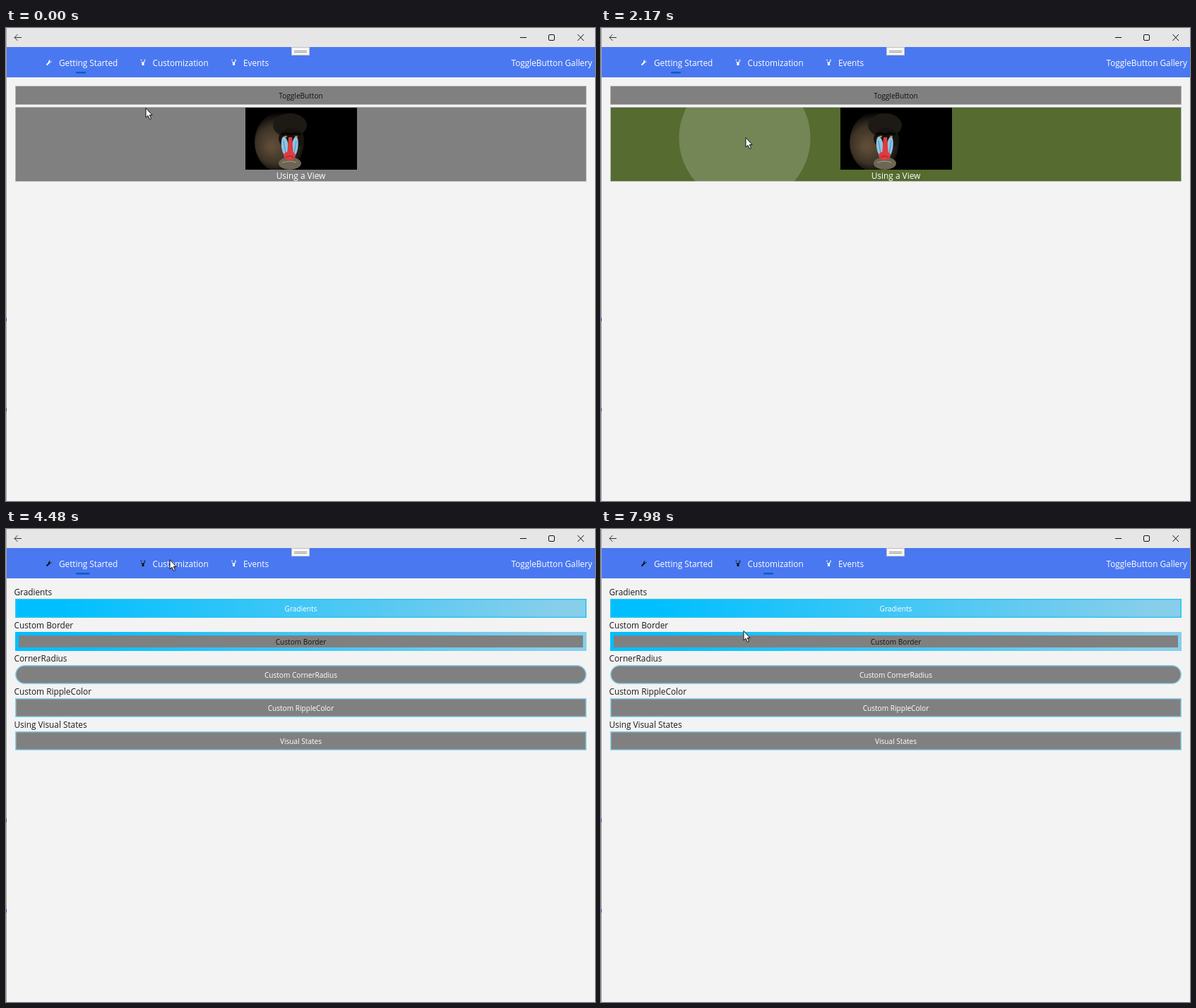
Animation of 834 by 671 pixels, one loop 8 s. Source, as an HTML page with a canvas:

```html
<!DOCTYPE html>
<html lang="en">
<head>
<meta charset="utf-8">
<title>ToggleButton Gallery</title>
<style>
html, body { margin: 0; width: 100%; height: 100%; overflow: hidden; background: #f3f3f3; }
canvas { display: block; }
</style>
</head>
<body>
<canvas id="stage" width="834" height="671"></canvas>
<script>
const ctx = document.getElementById('stage').getContext('2d');
const LOOP = 8000, STEP = 70, PAGE_SWITCH = 4480;
const GRAY = '#808080', SKY = '#87ceeb', OLIVE = '#556b2f';

// Pointer tip: time, x, y
const pointerPath = [
  [0, 197, 113], [350, 211, 96], [1540, 211, 96], [1960, 204, 155],
  [2380, 204, 155], [2660, 211, 164], [2870, 211, 164], [2940, 210, 163],
  [3500, 210, 163], [4060, 211, 42], [4270, 231, 43], [4690, 231, 43],
  [5250, 190, 113], [5320, 194, 114], [5390, 192, 115], [6650, 192, 115],
  [6720, 190, 113], [6790, 188, 112], [6860, 188, 112], [6930, 190, 113],
  [7560, 190, 113], [7980, 201, 144]
];
const clicks = { plain: [560, 1330], view: [2170, 3290], gradient: [5670, 7210] };

function pointerAt(t) {
  const i = pointerPath.findIndex(p => p[0] > t);
  if (i < 0) return pointerPath[pointerPath.length - 1].slice(1);
  const [t0, x0, y0] = pointerPath[i - 1], [t1, x1, y1] = pointerPath[i];
  const k = (t - t0) / (t1 - t0), e = k * k * (3 - 2 * k);
  return [x0 + (x1 - x0) * e, y0 + (y1 - y0) * e];
}

const isOn = ([on, off], t) => t >= on && t < off;

function rect(x, y, w, h, fill) {
  ctx.fillStyle = fill;
  ctx.fillRect(x, y, w, h);
}

function text(str, x, y, size, color, align = 'left') {
  ctx.font = `${size}px "Open Sans", "Noto Sans", sans-serif`;
  ctx.textAlign = align;
  ctx.fillStyle = color;
  ctx.fillText(str, x, y);
}

function path(d, stroke, width = 1, fill) {
  const p = new Path2D(d);
  if (fill) { ctx.fillStyle = fill; ctx.fill(p); }
  if (stroke) { ctx.strokeStyle = stroke; ctx.lineWidth = width; ctx.stroke(p); }
}

function ellipse(x, y, rx, ry, fill, angle = 0) {
  ctx.fillStyle = fill;
  ctx.beginPath();
  ctx.ellipse(x, y, rx, ry, angle, 0, 7);
  ctx.fill();
}

function gradient(from, to) {
  const g = ctx.createLinearGradient(13, 0, 822, 0);
  g.addColorStop(0.08, from);
  g.addColorStop(0.95, to);
  return g;
}

function button(y, h, fill, border, width = 1, radius = 0) {
  const inset = width / 2;
  ctx.beginPath();
  ctx.roundRect(13 + inset, y + inset, 809 - width, h - width, radius);
  ctx.fillStyle = fill;
  ctx.fill();
  ctx.strokeStyle = border;
  ctx.lineWidth = width;
  ctx.stroke();
}

function ripple(times, t, y, h) {
  const start = times.find(c => t >= c && t < c + 3 * STEP);
  if (start === undefined) return;
  const [x, cy] = pointerAt(start);
  ctx.save();
  ctx.beginPath();
  ctx.rect(13, y, 809, h);
  ctx.clip();
  const r = 3.36 * (t - start + 27.7);
  ellipse(x - 0.5, cy + 1, r, r, 'rgba(255,255,255,.185)');
  ctx.restore();
}

function photo() {
  ctx.save();
  ctx.beginPath();
  ctx.rect(339, 113, 158, 88);
  ctx.clip();
  rect(339, 113, 158, 88, '#000');
  const fur = ctx.createRadialGradient(376, 168, 4, 384, 164, 42);
  fur.addColorStop(0, '#5e4c36');
  fur.addColorStop(0.6, '#3c3226');
  fur.addColorStop(1, '#080706');
  ellipse(387, 162, 35, 42, fur);
  ellipse(402, 138, 24, 17, '#1d1a15');
  ellipse(404, 157, 18, 15, '#17130f');
  ellipse(402, 192, 16, 9, '#6f6555');
  ellipse(395, 168, 5, 14, '#8fc4e6', -0.12);
  ellipse(409, 168, 4.5, 14, '#8fc4e6', 0.12);
  path('M393 160L396 178M411 160L408 178', '#4f8cb9');
  path('M400 155H405L407 181H398Z', null, 1, '#dc3c3c');
  ellipse(401.5, 181, 8.5, 6, '#e33a41');
  path('M396 184Q402 179 407 184', '#8d1c26');
  path('M390 151Q397 148 403 151Q410 148 417 151', '#050505', 3);
  ellipse(396, 154, 2, 1.2, '#b08b52');
  ellipse(411, 154, 2, 1.2, '#b08b52');
  path('M391 191Q402 187 411 191', '#aaa08c');
  ctx.restore();
}

function sparkIcon(x, color) {
  path(`M${x} 45.5h2M${x + 5} 45l2 1M${x + 1} 48l2 1M${x + 6} 47l-2 2`, color, 1.2);
  rect(x + 2, 49, 3, 4, color);
}

function underline(t) {
  const k = Math.min(1, Math.max(0, (t - 4420) / 600));
  const ease = x => 0.14 * x + 0.86 * x ** 12;
  const lead = ease(Math.min(1, k * 3));
  const trail = 1 - ease(1 - Math.max(0, k * 1.5 - 0.5));
  ctx.beginPath();
  ctx.roundRect(99 + 131 * trail, 62, 14 + 131 * (lead - trail), 2.6, 1.3);
  ctx.fillStyle = '#0560bd';
  ctx.fill();
}

function chrome(t) {
  rect(0, 0, 834, 671, '#f3f3f3');
  rect(0, 0, 834, 27, '#e6e6e6');
  rect(0, 27, 834, 43, '#4a78f0');
  rect(0, 0, 1, 671, '#a6a6a6');
  rect(0, 411, 1, 5, '#4040d0');
  rect(0, 539, 1, 5, '#4040d0');
  path('M22 13.5H12M16.5 9L12 13.5L16.5 18', '#333');
  path('M728 13.5h9M809.5 9l8.5 9M818 9l-8.5 9', '#111');
  ctx.beginPath();
  ctx.roundRect(768.5, 9.5, 8, 8, 1.5);
  ctx.stroke();
  rect(404, 27, 26, 12, '#c2c2c2');
  rect(405, 28, 24, 10, '#f5f5f5');
  path('M408 32.5h18M408 34.5h18', '#999');

  const iconColor = t < PAGE_SWITCH ? '#fff' : '#111';
  path('M57.5 52.5L62 48', iconColor, 2);
  path('M64.5 46.5L62.5 48.5L61.5 47.5L63 45.5Q59.5 45 60 49Q64.5 50 64.5 46.5Z', null, 1, iconColor);
  sparkIcon(190.5, iconColor);
  sparkIcon(319, '#fff');
  text('Getting Started', 75, 54, 11.8, '#fff');
  text('Customization', 207.5, 54, 11.8, '#fff');
  text('Events', 336, 54, 11.8, '#fff');
  text('ToggleButton Gallery', 830, 54, 11.8, '#fff', 'right');
  underline(t);
}

function startedPage(t) {
  button(82, 27, isOn(clicks.plain, t) ? SKY : GRAY, '#b2b2b2');
  text('ToggleButton', 417.5, 100, 10.1, '#111', 'center');
  ripple(clicks.plain, t, 82, 27);

  button(112, 106, isOn(clicks.view, t) ? OLIVE : GRAY, '#b2b2b2');
  photo();
  ripple(clicks.view, t, 112, 106);
  text('Using a View', 417.5, 214, 11.9, '#fff', 'center');
}

function customPage(t) {
  const blue = gradient('#00bfff', SKY);
  const hot = isOn(clicks.gradient, t);
  const labels = ['Gradients', 'Custom Border', 'CornerRadius', 'Custom RippleColor', 'Using Visual States'];
  const captions = ['Gradients', 'Custom Border', 'Custom CornerRadius', 'Custom RippleColor', 'Visual States'];

  button(99, 27, hot ? gradient('#ffa500', '#ff4500') : blue, hot ? '#e31212' : '#2fc5ee', 1.6);
  ripple(clicks.gradient, t, 99, 27);
  button(146, 27, GRAY, blue, 5);
  button(193, 27, GRAY, SKY, 1.5, 13);
  button(240, 27, GRAY, SKY, 1.5);
  button(287, 27, GRAY, SKY, 1.5);
  labels.forEach((label, i) => {
    text(label, 11.5, 94 + 47 * i, 11.8, '#1a1a1a');
    text(captions[i], 417.5, 117 + 47 * i, 10.1, i === 1 ? '#111' : '#fff', 'center');
  });
}

function pointer(t) {
  const [x, y] = pointerAt(t);
  ctx.save();
  ctx.translate(Math.round(x) + 0.5, Math.round(y) + 0.5);
  path('M0.5 0V13.5L3.5 10.7L5.8 16L8 15L5.8 10H9.5Z', '#111', 1, '#fff');
  ctx.restore();
}

function draw(now) {
  const t = Math.floor((now % LOOP) / STEP) * STEP;
  chrome(t);
  (t < PAGE_SWITCH ? startedPage : customPage)(t);
  pointer(t);
}

const begin = performance.now();
function tick() {
  draw(performance.now() - begin);
  requestAnimationFrame(tick);
}
tick();
</script>
</body>
</html>
```
